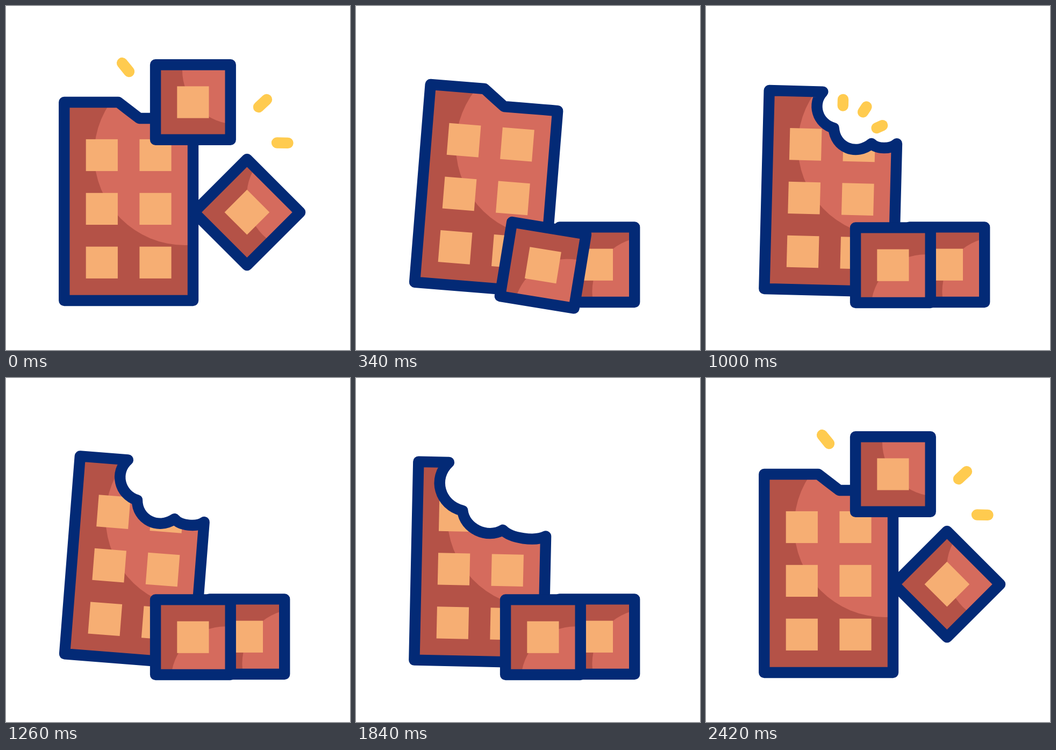
Recreate the animation shown at these times as an HTML page with a canvas. Size 640 by 640 pixels, loop 2620 ms.

```html
<!DOCTYPE html>
<html lang="en">
<head>
<meta charset="utf-8">
<title>Chocolate bar</title>
<style>
  html, body { margin: 0; width: 100%; height: 100%; overflow: hidden; background: #fff; }
  canvas { display: block; width: 640px; height: 640px; }
</style>
</head>
<body>
<canvas id="stage" width="640" height="640"></canvas>
<script>
const ctx = document.getElementById('stage').getContext('2d');
const LOOP = 2620, STEP = 20, BEAT = 400, LINE = 20.4;
const NAVY = '#032a76', DARK = '#b45247', LIGHT = '#d56b5d', CREAM = '#f6ae73', YELLOW = '#ffcb4f';

const clamp = x => Math.min(1, Math.max(0, x));
const smooth = x => x * x * (3 - 2 * x);
const ramp = (t, from, to) => smooth(clamp((t - from) / (to - from)));
const mix = (a, b, k) => a + (b - a) * k;
const rad = deg => deg * Math.PI / 180;

// Corners of the bar's top edge: x, y and the depth of the scoop that leads there.
const NOTCH = [[209, 179, 0], [248, 209, 0], [321, 209, 0], [348, 209, 0]];
const BITE_ONE = [[208, 179, 0], [230, 246, 20], [301, 273, 24.5], [348, 272, 8]];
const BITE_TWO = [[160, 179, 0], [186, 275, 32], [262, 313, 23.5], [348, 324, 11]];

// The bar swings to the next angle on every beat.
const SWINGS = [0, 4.9, -2, 4.9, -2, 3, 0];

function lean(t) {
  const i = Math.min(Math.floor(t / BEAT), SWINGS.length - 2);
  return mix(SWINGS[i], SWINGS[i + 1], ramp(t, i * BEAT, (i + 1) * BEAT));
}

const lift = t => 16 * ramp(t, 0, 400) + 3.4 * ramp(t, 1600, 2000) - 19.4 * ramp(t, 2000, 2400);
const fall = t => ramp(t, 80, 320) - ramp(t, 1840, 2230);
const spin = t => -10 * ramp(t, 0, 80) + 110 * ramp(t, 80, 320) - 10 * ramp(t, 320, 440) - 90 * ramp(t, 1840, 2210);

const morph = (from, to, k) => from.map((corner, i) => corner.map((v, j) => mix(v, to[i][j], k)));

function topEdge(t) {
  let edge = morph(NOTCH, BITE_ONE, ramp(t, 800, 1000));
  edge = morph(edge, BITE_TWO, ramp(t, 1200, 1400));
  return morph(edge, NOTCH, ramp(t, 1800, 2005));
}

function scoop(path, [x0, y0], [x1, y1, depth]) {
  const dx = x1 - x0, dy = y1 - y0;
  const push = depth * 4 / 3 / Math.hypot(dx, dy);
  const control = k => [x0 + dx * k - dy * push, y0 + dy * k + dx * push];
  path.bezierCurveTo(...control(0.21), ...control(0.77), x1, y1);
}

function disc(x, y, r) {
  ctx.fillStyle = LIGHT;
  ctx.beginPath();
  ctx.arc(x, y, r, 0, 2 * Math.PI);
  ctx.fill();
}

function cream(x, y) {
  ctx.fillStyle = CREAM;
  ctx.fillRect(x - 29.6, y - 29.6, 59.2, 59.2);
}

function chocolate(path, drawInside) {
  ctx.save();
  ctx.clip(path);
  ctx.fillStyle = DARK;
  ctx.fill(path);
  drawInside();
  ctx.restore();
  ctx.strokeStyle = NAVY;
  ctx.stroke(path);
}

// A dash pointing along an angle, drawn between two shares of its length.
function spark(x, y, degrees, length, start, end) {
  if (end <= start) return;
  const dx = length * Math.cos(rad(degrees)), dy = length * Math.sin(rad(degrees));
  ctx.strokeStyle = YELLOW;
  ctx.beginPath();
  ctx.moveTo(x + dx * start, y + dy * start);
  ctx.lineTo(x + dx * end, y + dy * end);
  ctx.stroke();
}

function fan(x, y, radius, t, begin) {
  const start = ramp(t, begin + 210, begin + 310), end = ramp(t, begin, begin + 156);
  for (let i = 0; i < 3; i++) {
    const degrees = -90 + 32 * i;
    spark(x + radius * Math.cos(rad(degrees)), y + radius * Math.sin(rad(degrees)), degrees, 16.5, start, end);
  }
}

function bar(t) {
  const edge = topEdge(t);
  const path = new Path2D();
  path.moveTo(108.3, 179);
  path.lineTo(edge[0][0], edge[0][1]);
  for (let i = 1; i < edge.length; i++) scoop(path, edge[i - 1], edge[i]);
  path.lineTo(348, 548);
  path.lineTo(108.3, 548);
  path.closePath();

  ctx.save();
  ctx.translate(348, 548 - lift(t));
  ctx.rotate(rad(lean(t)));
  ctx.translate(-348, -548);
  chocolate(path, () => {
    disc(333, 276, 169);
    for (let row = 0; row < 3; row++)
      for (let column = 0; column < 2; column++) cream(178.3 + 99.7 * column, 277.5 + 99.9 * row);
  });
  fan(246, 275, 71, t, 900);
  fan(229, 304, 82, t, 1300);
  ctx.restore();
}

function block(x, y, angle, shineX, shineY) {
  const path = new Path2D();
  path.rect(-69.8, -69.8, 139.6, 139.6);
  ctx.save();
  ctx.translate(x, y);
  ctx.rotate(rad(angle));
  chocolate(path, () => {
    disc(shineX, shineY, 101);
    cream(0, 0);
  });
  ctx.restore();
}

function draw(t) {
  ctx.fillStyle = '#fff';
  ctx.fillRect(0, 0, 640, 640);
  ctx.lineWidth = LINE;
  ctx.lineCap = ctx.lineJoin = 'round';

  const drop = fall(t);
  bar(t);
  block(448.4, mix(383.7, 481.2, drop), mix(45, 90, drop), 50, -92);
  block(347.9, mix(179, 482.2, drop), spin(t), 81, -60);

  const start = t < LOOP / 2 ? ramp(t, 0, 160) : 0;
  const end = t < LOOP / 2 ? 1 : ramp(t, 2000, 2150);
  spark(229, 122, -129, 20.5, start, end);
  spark(470, 188, -43, 20.5, start, end);
  spark(504, 254.5, 1, 20.5, start, end);
}

const began = performance.now();
function tick() {
  const t = (performance.now() - began) % LOOP;
  draw(Math.floor(t / STEP) * STEP);
  requestAnimationFrame(tick);
}
tick();
</script>
</body>
</html>
```
